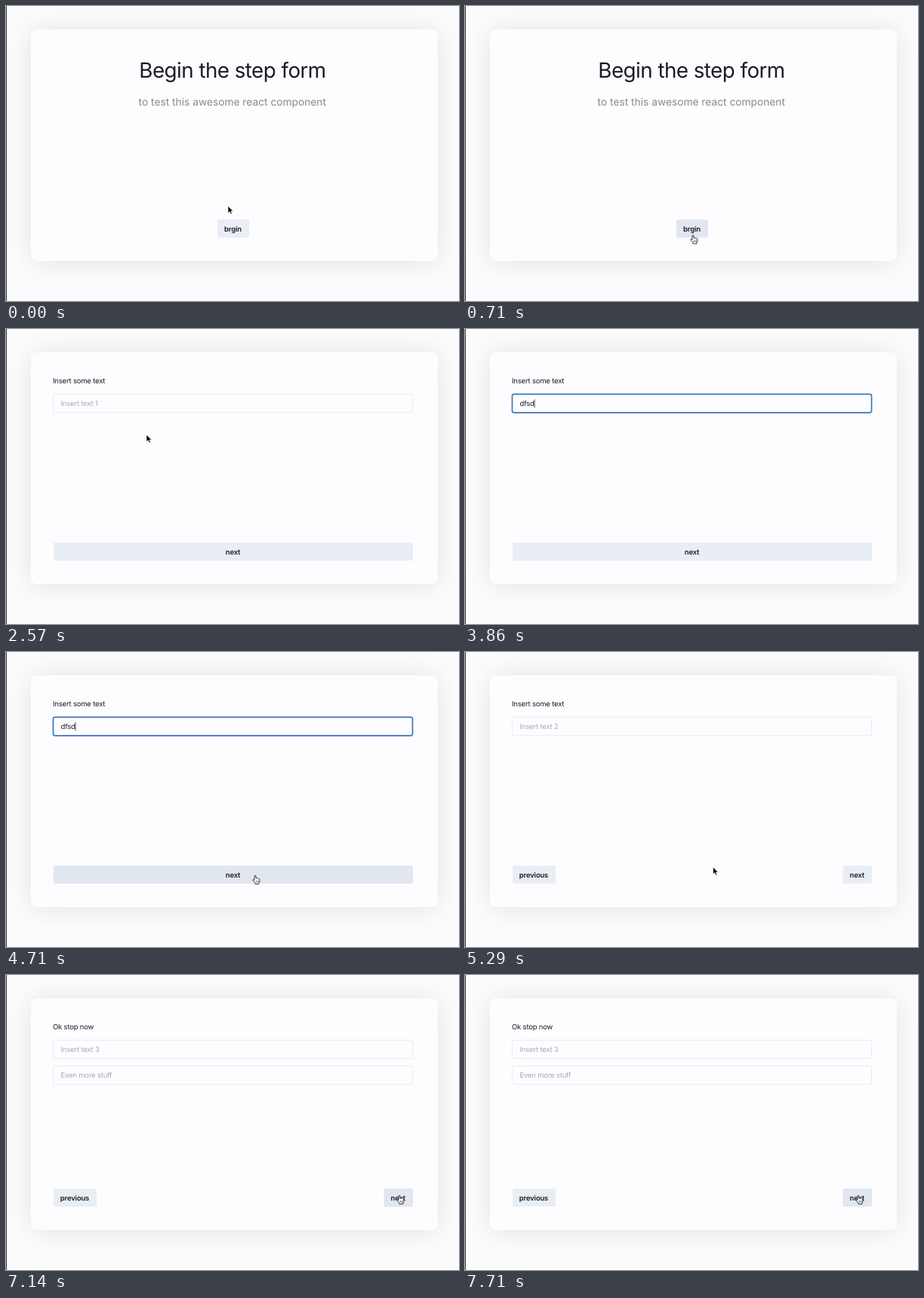
Write an HTML page that moves like this. It is 600 by 391 pixels and loops after 8 s.

```html
<!DOCTYPE html>
<html lang="en">
<head>
<meta charset="utf-8">
<title>Step form</title>
<style>
  html, body { margin: 0; width: 100%; height: 100%; overflow: hidden; background: #fcfbfd; }
  svg { display: block; width: 100vw; height: 100vh; }
  text {
    font-family: Inter, Roboto, "Liberation Sans", sans-serif;
    font-size: 9.5px; letter-spacing: -.02em;
    font-optical-sizing: none; fill: #1a1d24; white-space: pre;
    text-rendering: geometricPrecision;
  }
  .title { font-size: 27.8px; text-anchor: middle; }
  .sub { font-size: 13.75px; letter-spacing: 0; text-anchor: middle; fill: #888a8e; }
  .hint { fill: #a3abb7; }
  .btn { font-weight: 600; text-anchor: middle; }
</style>
</head>
<body>
<svg viewBox="0 0 600 391" preserveAspectRatio="none">
  <defs>
    <filter id="soft" x="-20%" y="-30%" width="140%" height="160%">
      <feGaussianBlur stdDeviation="18"/>
    </filter>
  </defs>
  <rect width="600" height="391" fill="#fcfbfd"/>
  <rect x="33" y="32" width="539" height="308" rx="8" opacity=".1" filter="url(#soft)"/>
  <rect x="33" y="31" width="539" height="307" rx="8" fill="#fdfcfe"/>
  <rect width="1" height="391" fill="#3c3c3e"/>
  <g id="page"></g>
  <g id="pointer"></g>
</svg>
<script>
const LOOP = 8000, FPS = 7;
const pageEl = document.getElementById('page');
const pointerEl = document.getElementById('pointer');

// Steps count ticks of 1/7 s
const pages = [
  { from: 0, buttons: [['brgin', 280, 42]] },
  { from: 9, label: 'Insert some text', hints: ['Insert text 1'], focus: 21,
    typed: 'dfsd', typeAt: 24, buttons: [['next', 63, 476]] },
  { from: 34, label: 'Insert some text', hints: ['Insert text 2'], focus: 40,
    typed: 'sdg', typeAt: 42, buttons: [['previous', 63, 57], ['next', 500.5, 38.5]] },
  { from: 50, label: 'Ok stop now', hints: ['Insert text 3', 'Even more stuff'],
    buttons: [['previous', 63, 57], ['next', 500.5, 38.5]] }
];

// Pointer path: step, x, y
const path = [
  [0, 294, 265], [1, 294, 265], [5, 302, 303.5], [10, 302, 303.5],
  [17, 186, 140], [18, 186, 140], [21, 150, 97], [28, 150, 97],
  [31, 330, 296], [35, 330, 296], [37, 328.5, 285], [40, 292, 97],
  [44, 292, 97], [45, 309, 132], [49, 521, 292], [56, 521, 292]
];
const hidden = [[24, 28], [42, 44]];

const text = (s, x, y, cls = '') => `<text x="${x}" y="${y}" class="${cls}">${s}</text>`;

function pointerAt(k) {
  if (hidden.some(([a, b]) => k >= a && k <= b)) return null;
  const i = path.findIndex(p => p[0] > k);
  const [t0, x0, y0] = path[i - 1], [t1, x1, y1] = path[i];
  const u = (k - t0) / (t1 - t0), e = u * u * (3 - 2 * u);
  return { x: x0 + (x1 - x0) * e, y: y0 + (y1 - y0) * e };
}

const inside = (p, x, y, w, h) => p && p.x >= x && p.x <= x + w && p.y >= y && p.y <= y + h;
const overButton = (p, [, x, w]) => inside(p, x, 283, w, 24);

function button(b, p) {
  const [name, x, w] = b;
  return `<rect x="${x}" y="283" width="${w}" height="24" rx="2" fill="${overButton(p, b) ? '#e1e7f0' : '#e9eef5'}"/>`
    + text(name, x + w / 2 - .5, 298.7, 'btn');
}

function input(y, hint, value, focused) {
  const stroke = focused ? 'stroke="#3d78bb" stroke-width="1.7"' : 'stroke="#e8ebf0"';
  return `<rect x="62.5" y="${y}" width="476" height="24.5" rx="2.5" fill="#fdfcfe" ${stroke}/>`
    + text(value || hint, 72.5, y + 15.8, value ? 'value' : 'hint')
    + (focused ? `<rect class="caret" x="72.5" y="${y + 7}" width=".8" height="11" fill="#222"/>` : '');
}

function drawPage(page, k, p) {
  let out = '';
  if (page.label) {
    const value = page.typed ? page.typed.slice(0, Math.max(0, k - page.typeAt + 1)) : '';
    out += text(page.label, 62, 72.4);
    page.hints.forEach((hint, i) => {
      out += input(86.3 + i * 34.2, hint, value, k >= page.focus);
    });
  } else {
    out += text('Begin the step form', 300, 95, 'title')
      + text('to test this awesome react component', 299.8, 132.3, 'sub');
  }
  pageEl.innerHTML = out + page.buttons.map(b => button(b, p)).join('');

  const value = pageEl.querySelector('.value'), caret = pageEl.querySelector('.caret');
  if (value && caret) caret.setAttribute('x', 72.5 + value.getComputedTextLength());
}

const arrow = '<path d="M0 0V9.6L2.2 7.6L3.8 11L5.4 10.3L3.9 7H6.8Z" fill="#000" stroke="#fff" stroke-width=".7"/>';
const hand = '<path d="M-1 .8Q0-.5 1 .8V4Q2 3.2 2.8 4.2Q3.7 3.6 4.4 4.6Q5.7 4.3 5.9 5.7V8Q5.7 9.5 4.9 10.3V11.5H0V10.4L-3 6.7Q-3.2 5.2-1.8 5.7L-1 6.5Z" fill="#fff" stroke="#222" stroke-width=".9"/>'
  + '<path d="M1.2 7V9.6M2.8 7V9.6M4.3 7V9.6" stroke="#222" stroke-width=".6"/>';
const beam = '<path d="M-2-5Q0-5 0-4Q0-5 2-5M0-4V4M-2 5Q0 5 0 4Q0 5 2 5" fill="none" stroke="#333" stroke-width=".9"/>';

function drawPointer(page, p) {
  if (!p) {
    pointerEl.innerHTML = '';
    return;
  }
  const onInput = page.label && inside(p, 62, 86, 477, 25);
  const shape = page.buttons.some(b => overButton(p, b)) ? hand : onInput ? beam : arrow;
  pointerEl.innerHTML = `<g transform="translate(${p.x} ${p.y})">${shape}</g>`;
}

let last = -1;
function frame(now) {
  const k = Math.floor((now % LOOP) * FPS / 1000 + .05) % (LOOP * FPS / 1000);
  if (k !== last) {
    last = k;
    const page = pages.filter(s => s.from <= k).pop();
    const p = pointerAt(k);
    drawPage(page, k, p);
    drawPointer(page, p);
  }
  requestAnimationFrame(frame);
}
frame(0);
</script>
</body>
</html>
```
